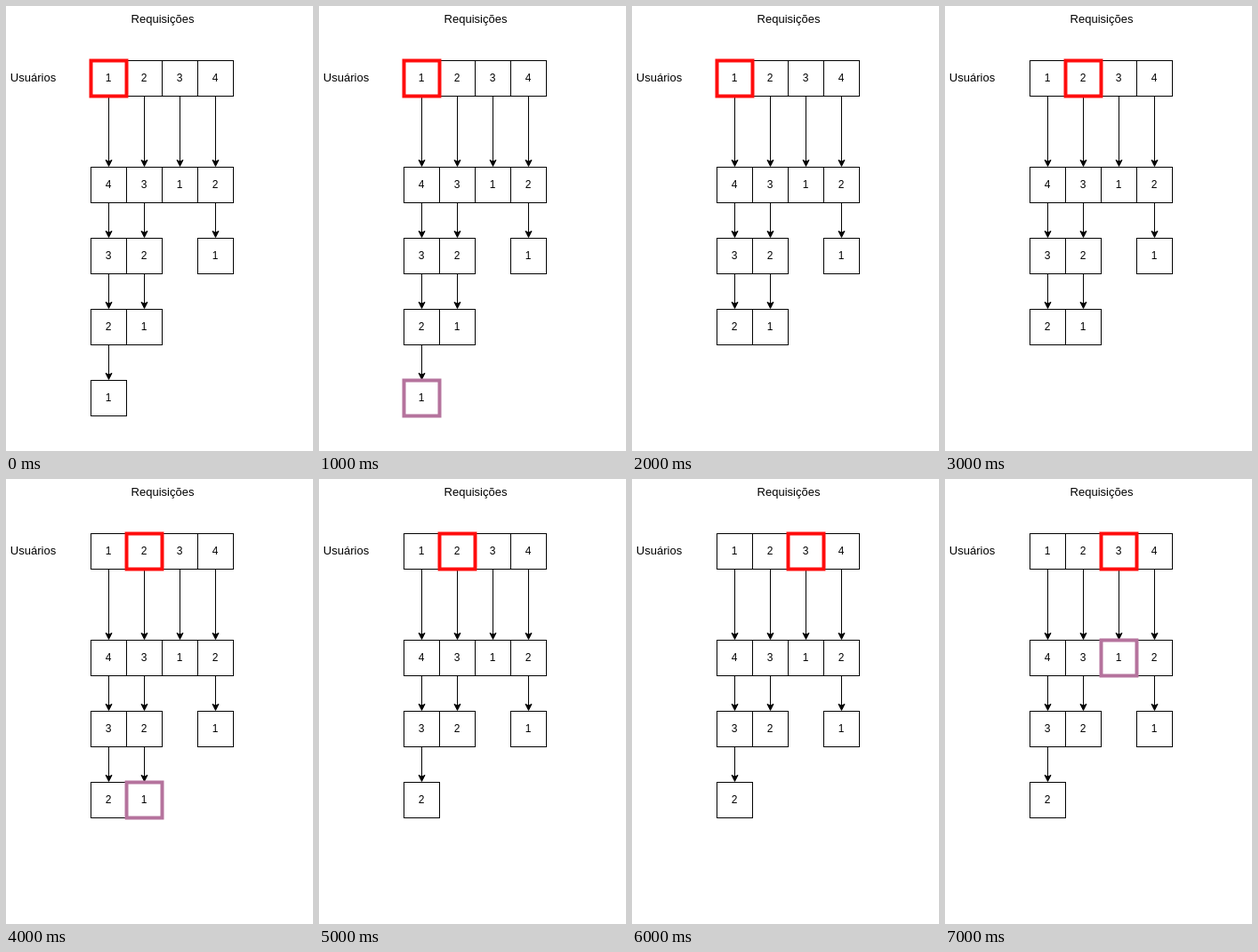
These frames come from a looping animation (345 px wide and 501 px high, 8000 ms). An HTML page:

```html
<!DOCTYPE html>
<html lang="pt">
<head>
<meta charset="utf-8">
<style>
  html, body { margin: 0; height: 100%; overflow: hidden; background: #fff; }
  svg { display: block; }
  text { font: 12px "Liberation Sans", Arial, sans-serif; text-anchor: middle; }
  .label { font-size: 13px; }
  .cell { fill: #fff; stroke: #000; }
  .arrow { fill: #000; stroke: #000; }
  .mark { fill: none; stroke-width: 4; }
</style>
</head>
<body>
<svg id="stage" width="345" height="501">
  <text class="label" x="176" y="19">Requisições</text>
  <text class="label" x="30.5" y="85">Usuários</text>
</svg>
<script>
const stage = document.getElementById('stage');
const SIZE = 40, STEP = 1000, LOOP = 8000;
const columns = ['14321', '2321', '31', '421'];

const left = col => 95.5 + SIZE * col;
const top_ = row => row ? 101.5 + 80 * row : 61.5;

function add(parent, tag, attrs, text = '') {
  const el = document.createElementNS('http://www.w3.org/2000/svg', tag);
  for (const name in attrs) el.setAttribute(name, attrs[name]);
  el.textContent = text;
  parent.append(el);
  return el;
}

const square = (parent, col, row, attrs) =>
  add(parent, 'rect', { x: left(col), y: top_(row), width: SIZE, height: SIZE, ...attrs });

function addNode(col, row, digit) {
  const group = add(stage, 'g', {});
  const x = left(col) + SIZE / 2, y = top_(row);
  square(group, col, row, { class: 'cell' });
  add(group, 'text', { x: x - 0.5, y: y + 23.5 }, digit);
  if (row) {
    const start = top_(row - 1) + SIZE, tip = y - 1.1;
    add(group, 'path', {
      class: 'arrow',
      d: `M${x} ${start}V${tip - 5.3}M${x} ${tip}l-3.5 -7l3.5 1.75l3.5 -1.75z`
    });
  }
  return group;
}

const nodes = columns.map((digits, col) =>
  [...digits].map((digit, row) => addNode(col, row, digit)));

const userMark = square(stage, 0, 0, { class: 'mark', stroke: '#ff0d0d' });
const requestMark = square(stage, 0, 0, { class: 'mark', stroke: '#b5739d' });

// Each user takes three steps: select, mark the last request, remove it.
function draw(now) {
  const step = Math.floor(now % LOOP / STEP);
  const user = Math.floor(step / 3), phase = step % 3;
  userMark.setAttribute('x', left(user));

  const last = columns[user].length - 1;
  requestMark.setAttribute('x', left(user));
  requestMark.setAttribute('y', top_(last));
  requestMark.style.display = phase === 1 ? '' : 'none';

  nodes.forEach((column, col) => {
    const removed = step >= col * 3 + 2;
    column.at(-1).style.display = removed ? 'none' : '';
  });
}

let origin;
function tick(now) {
  origin ??= now;
  draw(now - origin);
  requestAnimationFrame(tick);
}
draw(0);
requestAnimationFrame(tick);
</script>
</body>
</html>
```
